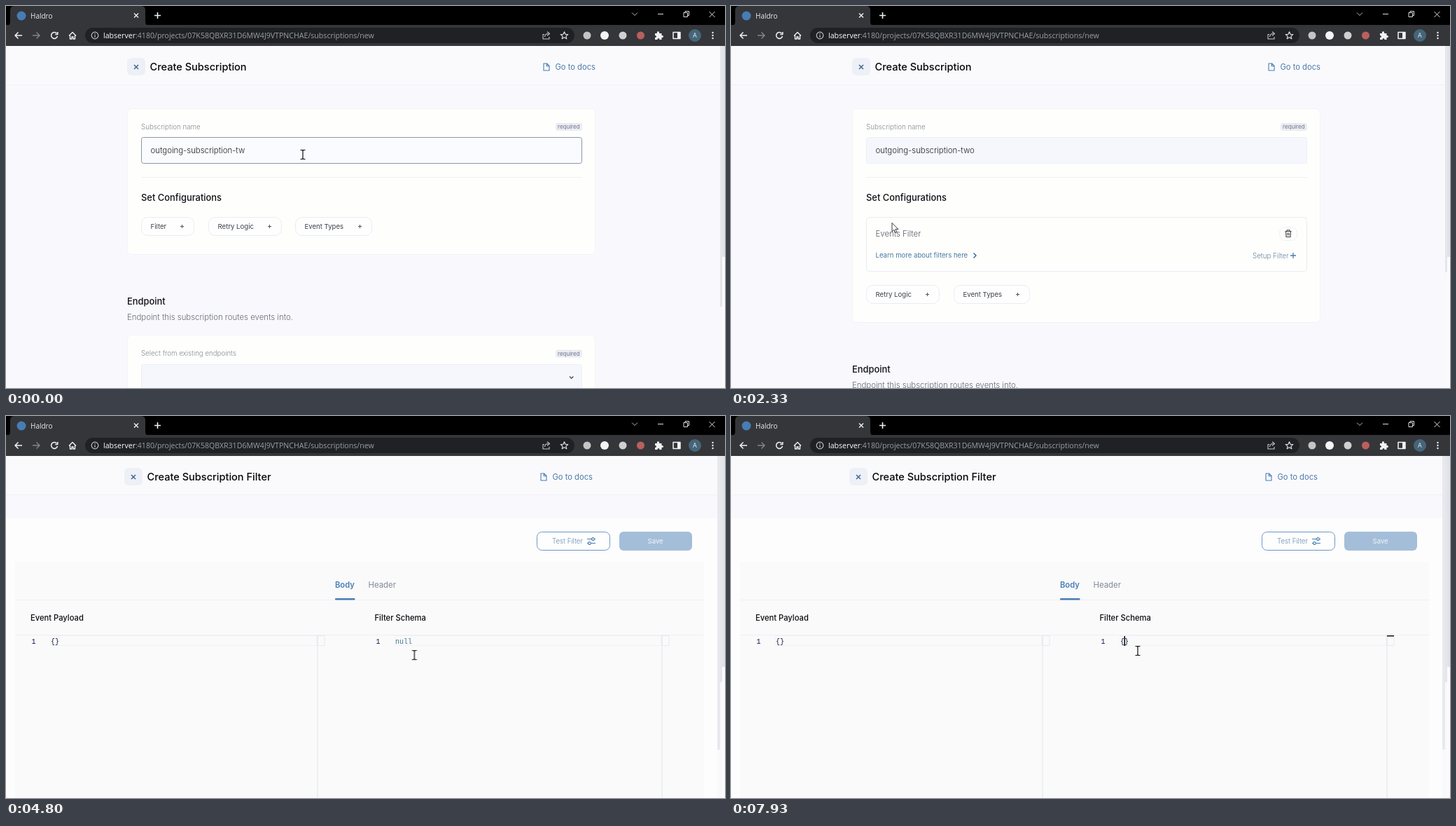
Animation, 1027 px wide and 545 px high, one loop 8 s. Source, as an HTML page:

```html
<!DOCTYPE html>
<html lang="en">
<head>
<meta charset="utf-8">
<title>Create subscription</title>
<style>
  html, body { margin: 0; width: 100%; height: 100%; overflow: hidden; background: #f9f9fd; }
  svg { display: block; width: 1027px; height: 545px; font-family: Inter, sans-serif; }
  .ui { font-family: "Open Sans", sans-serif; }
  .code { font-family: "Liberation Mono", monospace; }
  text { white-space: pre; }
</style>
</head>
<body>
<svg id="stage" viewBox="0 0 1027 545"></svg>
<script>
const LOOP = 8000;
const BLUE = '#477db3', INK = '#101216', BODY = '#3c4048', MUTED = '#858993', EDGE = '#eaecf4';
const PAGE = '#f9f9fd', HEADER = '#fafafd', RULE = '#f0f0f5', THUMB = '#e5e6ec';

// Text is placed by its left edge and the middle of its capitals.
const text = (x, mid, str, size, weight = 400, fill = INK, extra = '') =>
  `<text x="${x}" y="${mid + size * 0.36}" font-size="${size}" font-weight="${weight}" fill="${fill}" ${extra}>${str}</text>`;
const rect = (x, y, x2, y2, fill, stroke = 'none', r = 0) => {
  const o = stroke === 'none' ? 0 : 0.5;
  return `<rect x="${x + o}" y="${y + o}" width="${x2 - x - 2 * o}" height="${y2 - y - 2 * o}" rx="${r}" fill="${fill}" stroke="${stroke}"/>`;
};
const line = (d, stroke, width = 1, fill = 'none') =>
  `<path d="${d}" fill="${fill}" stroke="${stroke}" stroke-width="${width}" stroke-linejoin="round"/>`;
const dot = (x, y, r, fill, stroke = 'none') =>
  `<circle cx="${x}" cy="${y}" r="${r}" fill="${fill}" stroke="${stroke}" stroke-width="1.2"/>`;
const group = (id, ...parts) => `<g id="${id}">${parts.join('')}</g>`;
const plus = (x, y, r, color, w = 1) => line(`M${x - r} ${y}h${2 * r}M${x} ${y - r}v${2 * r}`, color, w);
const cross = (x, y, r, color, w = 1) =>
  line(`M${x - r} ${y - r}l${2 * r} ${2 * r}m0 ${-2 * r}l${-2 * r} ${2 * r}`, color, w);

const browser = () => [
  rect(0, 0, 1027, 30, '#000'),
  rect(0, 27, 1027, 57, '#35363a'),
  line('M1 28Q6 28 6 22V6Q6 0 12 0H193Q199 0 199 6V22Q199 28 204 28Z', 'none', 0, '#35363a'),
  dot(22, 14, 6.5, BLUE),
  text(35, 14, 'Haldro', 10, 400, '#e8eaed', 'class="ui"'),
  cross(186, 13.5, 3, '#f1f3f4', 1.4),
  plus(216.5, 13.5, 4.5, '#f1f3f4', 1.6),
  line('M894 9.5l4 4 4-4', '#bbb'),
  line('M931 11.5h8', '#ddd'),
  line('M968 9.5h5.5v6h-5.5zM970 9v-1.5h5.5v6h-1.5', '#ddd'),
  cross(1008.5, 12, 4, '#ddd'),
  rect(113, 31, 812, 53, '#202124', 'none', 11),
  line('M23 42H13.5M17.5 37.5L13 42l4.5 4.5', '#f1f3f4', 1.5),
  line('M38 42h9.5M43.5 37.5L48 42l-4.5 4.5', '#85878b', 1.4),
  line('M72.5 39A4.5 4.5 0 1 0 73.5 43M73.8 37v3.5h-3.5', '#f1f3f4', 1.5),
  line('M90 42.5L95 37.5l5 5M91.5 42v5h2.5v-3h2v3h2.5v-5', '#f1f3f4', 1.4),
  dot(127, 42, 4.8, 'none', '#bdc1c6'),
  line('M127 41.5v3.2M127 39v1.3', '#bdc1c6', 1.3),
  text(139, 42.2, '<tspan fill="#fff">labserver</tspan>:4180/projects/07K58QBXR31D6MW4J9VTPNCHAE/subscriptions/new',
    10.6, 400, '#9aa0a6', 'class="ui"'),
  line('M769 40.5h-2v6.5h9v-3M769.5 44q.5-4.5 5-4.5M773 36.8l3.5 2.7-3.5 2.7', '#c4c7ca', 1.1),
  line('M797.5 36.8l1.5 3.5 3.8.3-2.9 2.5.9 3.7-3.3-2-3.3 2 .9-3.7-2.9-2.5 3.8-.3z', '#dadce0', 1.2),
  dot(830, 42, 5.5, '#c5c5c5'),
  dot(855, 42, 6, '#f4f4f4'),
  dot(881, 42, 5.5, '#d0d0d0'),
  dot(906.5, 42, 5.5, '#b9605c'),
  line('M927 39h3q-.7-2.8 1.5-2.8T933 39h3.5v3q2.5-.5 2.5 1.5t-2.5 1.5v3h-3q0-2-1.5-2t-1.5 2H927v-3q2 0 2-1.5T927 42z', 'none', 0, '#f1f3f4'),
  line('M953 37.5h10v9h-10z', '#f1f3f4', 1.5),
  rect(959, 37, 963, 47, '#f1f3f4'),
  dot(984, 42, 9, '#46657a'),
  text(981, 42, 'A', 9, 400, '#e8eef2', 'class="ui"'),
  ...[38, 42, 46].map(y => dot(1009.5, y, 1.2, '#f1f3f4'))
].join('');

const header = (title, dx) => [
  rect(0, 57, 1027, 112, HEADER),
  rect(0, 112, 1027, 113, RULE),
  `<g transform="translate(${dx})">`,
  rect(173, 74, 199, 99, '#edf0f7', 'none', 6),
  cross(186, 87, 3, '#49698d', 1.6),
  text(205.5, 86.5, title, 14.55, 500, '#050608'),
  line('M768 82h4.5l3.5 3.5v6.5h-8zM772.3 82v3.7h3.7', BLUE, 1.1),
  text(784.5, 87, 'Go to docs', 11.2, 400, '#4d7ba8'),
  '</g>'
].join('');

const required = y =>
  rect(785, y - 5.5, 823, y + 5.5, '#ebecf3', 'none', 3) + text(788, y, 'required', 8, 400, '#70758a');

const pill = (x, x2, y, label) =>
  rect(x, y, x2, y + 27, '#fefefe', EDGE, 9) + text(x + 13.5, y + 13.5, label, 9.6, 400, BODY) +
  plus(x2 - 17.5, y + 13.5, 2.5, '#555');

const card = (y, y2) => rect(173, y, 842, y2, '#fefefd', '#f2f3f7', 6);

const nameValue = str => text(206.5, 206, str, 11.4, 300, '#222');

const nameField = () => [
  text(193, 172.5, 'Subscription name', 9.75, 300, MUTED),
  required(172.5),
  group('blurred', rect(193, 187, 823, 225, '#f5f7fd', '#ebeff6', 3)),
  group('focused', rect(193, 187, 823, 225, '#fafbfe', '#8797a5', 3)),
  group('partName', nameValue('outgoing-subscription-tw')),
  group('fullName', nameValue('outgoing-subscription-two')),
  rect(193, 244, 823, 245, '#efeff3'),
  text(193, 273, 'Set Configurations', 12.9, 500)
].join('');

const endpoint = y =>
  text(173, y, 'Endpoint', 12.9, 500) +
  text(173, y + 22.5, 'Endpoint this subscription routes events into.', 11.4, 300, '#666a73');

const trash = line('M791.5 321.5h9M794 321.5v-1.7h4v1.7M792.5 321.5l.5 8h6l.5-8M795 323.5v4M797 323.5v4', '#444', 1.1);

const formPage = () => group('form',
  header('Create Subscription', 0),
  group('plainCard', card(146, 355)),
  group('tallCard', card(146, 452)),
  nameField(),
  group('plainConfig',
    pill(193, 269, 301, 'Filter'), pill(289, 394, 301, 'Retry Logic'), pill(413, 523, 301, 'Event Types'),
    endpoint(421),
    card(469, 560),
    text(193, 496, 'Select from existing endpoints', 9.7, 300, MUTED),
    required(496),
    rect(193, 511, 823, 560, '#f5f7fd', '#ebeff6', 3),
    line('M805 528.5l2.7 2.7 2.7-2.7', '#4a4f5a', 1.3),
    rect(1020, 57, 1023, 429, THUMB)),
  group('filterConfig',
    rect(193, 301, 823, 379, '#fefefd', EDGE, 4),
    text(206.5, 325, 'Events Filter', 11.4, 300, '#555963'),
    rect(783, 315, 809, 335, '#fefefe', '#eff0f5', 8), trash,
    text(206.5, 356, 'Learn more about filters here', 9.6, 400, '#47789f'),
    line('M346.5 352.5l3.5 3.5-3.5 3.5', '#356c9b', 1.5),
    text(745, 356, 'Setup Filter', 9.75, 300, '#63829f'),
    plus(803, 356, 4, BLUE, 1.3),
    pill(193, 298, 398, 'Retry Logic'), pill(318, 427, 398, 'Event Types'),
    endpoint(518),
    rect(1020, 57, 1023, 380, THUMB)));

const code = (x, str, fill) => text(x, 321, str, 10, 400, fill, 'class="code"');
const braces = x => code(x, '{}', '#101c40');
const caret = x => rect(x, 314, x + 1.5, 328, '#000');
const editor = x =>
  rect(x + 28, 313, x + 409, 328, 'none', '#f0f1f5') +
  rect(x + 409, 313, x + 420, 328, 'none', '#e7eaf0') +
  rect(x + 409, 313, x + 410, 545, '#e3e5eb') +
  code(x + 1, '1', '#0b1650');

const filterPage = () => group('filter',
  header('Create Subscription Filter', -4),
  rect(0, 146, 1016, 545, '#fdfdfd'),
  rect(13, 208, 997, 545, '#fafafb'),
  rect(758, 165, 863, 192, '#fefefe', '#6c98c5', 7),
  text(780, 178.5, 'Test Filter', 9.7, 300, '#6089b2'),
  line('M830 175.5h6.5M840.5 175.5h1.5M830 181.5h1.5M835.5 181.5h6.5', BLUE, 1.1),
  dot(838.5, 175.5, 1.9, 'none', BLUE), dot(833.5, 181.5, 1.9, 'none', BLUE),
  rect(876, 165, 980, 192, '#a4bed9', 'none', 6),
  text(916.5, 178.5, 'Save', 9.6, 400, '#f0f5fa'),
  text(470, 241, 'Body', 11.2, 600, BLUE),
  text(517.5, 241, 'Header', 11.4, 400, '#848995'),
  rect(13, 262, 997, 263, RULE),
  rect(470, 260, 498.5, 262.5, BLUE, 'none', 1),
  text(35, 288, 'Event Payload', 11.2, 500, '#0b0c10'),
  text(526.5, 288, 'Filter Schema', 11.2, 500, '#0b0c10'),
  rect(13, 312, 997, 313, RULE),
  group('editors',
    editor(35.5), editor(527.5),
    braces(64),
    group('selection', rect(556, 314, 580, 328, '#add6ff')),
    group('nullValue', code(556, 'null', '#457686')),
    group('braces', braces(556)),
    group('focusMark', rect(937, 313, 947, 314.5, '#111')),
    group('caretClick', caret(573.5)),
    group('caretWord', caret(579.5)),
    group('caretEmpty', caret(556)),
    group('caretBraces', caret(561.5))),
  rect(1016, 57, 1020, 476, '#e8e9ee'),
  rect(1020, 57, 1023, 380, THUMB));

const pointer = () => group('pointer',
  group('arrow', line('M0 .5V12.8l2.9-2.6 2 4.3 2-.9-2-4.2h4z', '#222', 0.9, '#fff')),
  group('beam', line('M-3.5-6.5h2.5l1 1 1-1h2.5M0-5.5v11M-3.5 6.5h2.5l1-1 1 1h2.5', '#111', 1.2)));

document.getElementById('stage').innerHTML =
  rect(0, 57, 1027, 545, PAGE) + formPage() + filterPage() +
  rect(1023, 57, 1027, 545, '#fbfbfc') + rect(1023, 57, 1027, 358, '#e2e3e9') +
  browser() + pointer();

// Spans of time, in ms, in which each part is visible.
const visible = {
  partName: [[0, 70]],
  fullName: [[70, LOOP]],
  focused: [[0, 1800]],
  blurred: [[1800, LOOP]],
  plainCard: [[0, 1800]],
  plainConfig: [[0, 1800]],
  tallCard: [[1800, LOOP]],
  filterConfig: [[1800, LOOP]],
  form: [[0, 3840]],
  filter: [[3840, LOOP]],
  editors: [[4500, LOOP]],
  nullValue: [[0, 6430]],
  selection: [[6100, 6430]],
  braces: [[6930, LOOP]],
  focusMark: [[5700, LOOP]],
  caretClick: [[5700, 6100]],
  caretWord: [[6100, 6430]],
  caretEmpty: [[6430, 6930]],
  caretBraces: [[6930, 7430], [7900, LOOP]],
  beam: [[0, 820], [4500, LOOP]],
  arrow: [[820, 4500]]
};

// Stops of the mouse: time, x, y.
const route = [
  [0, 424, 212], [400, 424, 212], [1070, 355, 242], [1650, 230, 309], [2500, 230, 309],
  [3500, 754, 354], [4100, 754, 354], [4260, 584, 342], [4750, 584, 342],
  [5000, 576, 331], [5330, 581, 335], [LOOP, 581, 335]
];

const play = (id, frames) =>
  document.getElementById(id).animate(frames, { duration: LOOP, iterations: Infinity });

for (const [id, spans] of Object.entries(visible)) {
  const times = [...new Set([0, ...spans.flat(), LOOP])].sort((a, b) => a - b);
  play(id, times.map(t => ({
    offset: t / LOOP,
    opacity: spans.some(([from, to]) => t >= from && t < to) ? 1 : 0,
    easing: 'steps(1, end)'
  })));
}

play('pointer', route.map(([t, x, y]) => ({
  offset: t / LOOP, transform: `translate(${x}px, ${y}px)`, easing: 'ease-in-out'
})));
</script>
</body>
</html>
```
